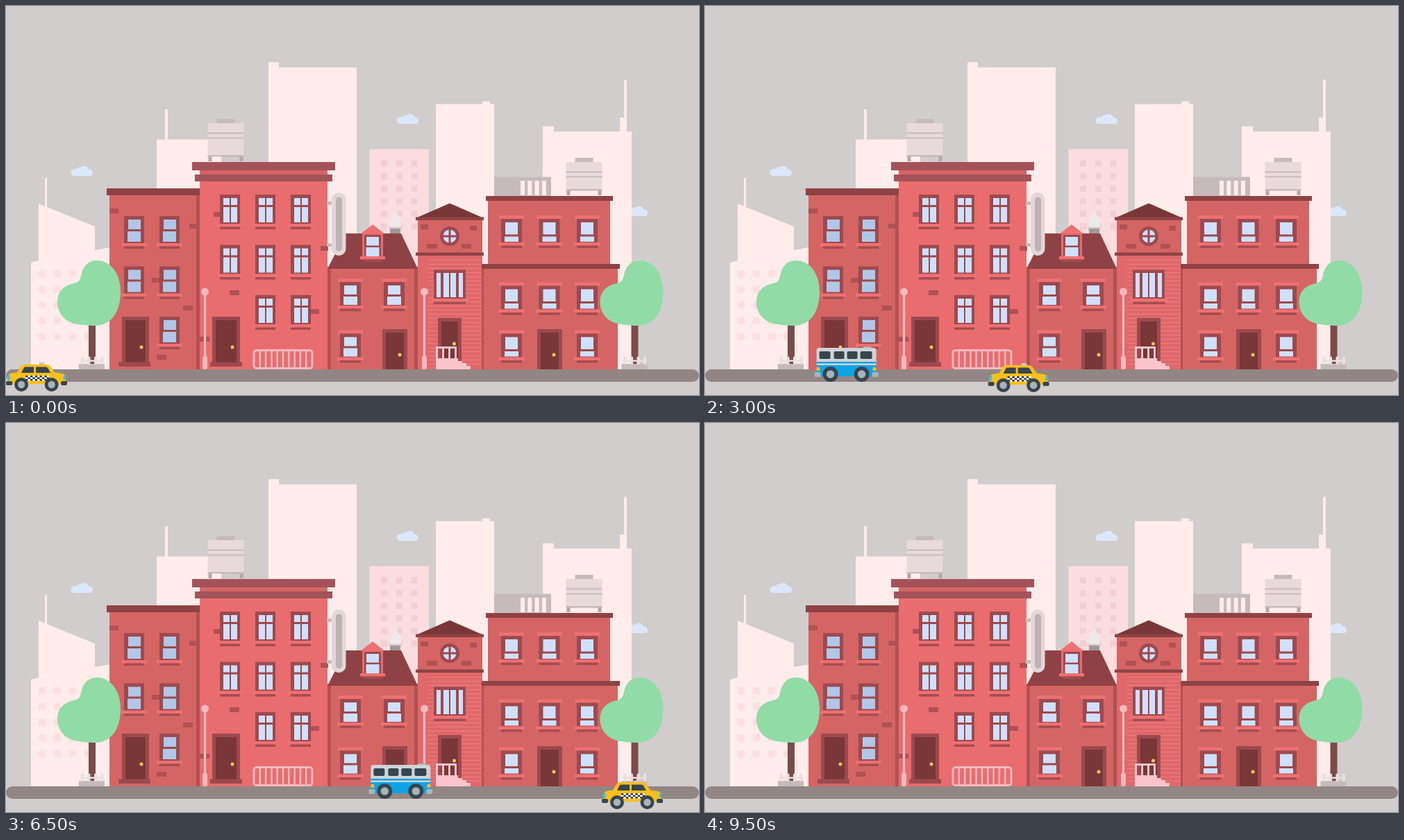
An HTML page that plays this animation: 998x561 px, repeating every 10000 ms.

```html
<!DOCTYPE html>
<html lang="en">
<head>
<meta charset="utf-8">
<title>City street</title>
<style>
html, body { margin: 0; width: 100%; height: 100%; overflow: hidden; background: #d1cdcc; }
svg { display: block; width: 100%; height: 100%; }
</style>
</head>
<body>
<svg id="stage" viewBox="0 0 998 561" preserveAspectRatio="none"></svg>
<script>
const LOOP = 10000;
const C = {
  pale: '#ffeceb', brick: '#d46564', coral: '#e96c6e', sill: '#ee7072', frame: '#9c4a4f',
  roof: '#8f4245', shade: '#b05154', door: '#7a3737', knob: '#f5c26b', glass: '#cfe0fd',
  dimGlass: '#b1c7e8', pink: '#f6b9bf', stone: '#c7babb', ink: '#37454f'
};

// Shape helpers; rectangles are given by their edges.
const box = (x1, y1, x2, y2, fill, r = 0) =>
  `<rect x="${x1}" y="${y1}" width="${x2 - x1}" height="${y2 - y1}" rx="${r}" fill="${fill}"/>`;
const poly = (points, fill) => `<polygon points="${points}" fill="${fill}"/>`;
const dot = (x, y, r, fill) => `<circle cx="${x}" cy="${y}" r="${r}" fill="${fill}"/>`;
const path = (d, fill) => `<path d="${d}" fill="${fill}"/>`;
const each = (list, draw) => list.map(draw).join('');
const grid = (xs, ys, draw) => each(ys, y => each(xs, x => draw(x, y)));
const steps = (from, gap, count) => Array.from({ length: count }, (_, i) => from + i * gap);
const bricks = list => each(list, ([x, y, w]) => box(x, y, x + w, y + 7, C.shade));

function sill(x1, x2, y) {
  return box(x1 - 4, y, x2 + 4, y + 4.5, C.sill) + box(x1, y + 4.5, x2, y + 8, '#a44c50');
}

function sashWindow(x, y) {
  return box(x, y, x + 29, y + 40, C.frame) +
    box(x + 6, y + 5, x + 24, y + 19, C.dimGlass) +
    box(x + 5, y + 22, x + 24, y + 37, C.dimGlass) + sill(x, x + 29, y + 39);
}

function crossWindow(x, y) {
  return box(x, y, x + 29, y + 42, C.frame) +
    grid([x + 5, x + 16], [y + 5], (a, b) =>
      box(a, b, a + 9, b + 10, C.glass) + box(a, b + 13, a + 9, b + 35, C.glass)) +
    sill(x, x + 29, y + 42);
}

// split: height of the lower edge of the upper pane
function hoodWindow(x, y, split) {
  return box(x - 3, y - 5, x + 33, y, C.sill) + box(x, y, x + 30, y + 34, C.frame) +
    box(x + 6, y + 5, x + 24, y + split, C.glass) +
    box(x + 5, y + split + 3, x + 25, y + 33, C.glass) + sill(x, x + 30, y + 34);
}

function door(x1, y1, x2, y2, knobX, knobY) {
  return box(x1, y1, x2, y2, C.frame) + box(x1 + 5, y1 + 5, x2 - 5, y2, C.door) +
    dot(knobX, knobY, 2.5, C.knob);
}

function cloud(x, y) {
  return path(`M${x + 5},${y} a5,5 0 0 1 0,-9.5 q2,-1.5 5,0 a5.5,5.5 0 0 1 6,-3
    a6.5,6.5 0 0 1 11,3 q6,0 6,5.5 q0,4 -4,4z`, '#dce8fa');
}

function tank(x, top, bottom, foot) {
  const w = 52;
  return box(x + 13, top, x + 39, top + 7, C.stone) +
    box(x + 1, bottom, x + 6, foot, '#b5a7a8') + box(x + 46, bottom, x + 51, foot, '#b5a7a8') +
    box(x, top + 6, x + w, bottom, '#e8d9db') +
    grid([x], [top + 19.5, top + 26.5], (a, b) => box(a, b, a + w, b + 1.8, C.stone)) +
    box(x, bottom - 1, x + w, bottom + 1.5, C.stone);
}

function skyline() {
  return cloud(92, 245) + cloud(561, 170) + cloud(891, 303) +
    box(56, 248, 59, 292, C.pale) +
    poly('47,285 128,318 128,352 150,348 150,524 36,524 36,370 47,367', C.pale) +
    grid(steps(47, 22, 4), steps(381, 22.7, 5), (x, y) => box(x, y, x + 10, y + 10, '#ffdedf')) +
    box(229, 149, 233, 194, C.pale) + box(217, 192.5, 310, 264, C.pale) +
    box(378, 81, 393, 90, C.pale) + box(378, 88.5, 505, 380, C.pale) +
    box(523.5, 206.5, 609, 380, '#fbdddf') +
    grid([540, 562, 583.5], steps(222.5, 18.2, 6), (x, y) => box(x, y, x + 9, y + 9, '#f3cfd1')) +
    box(686, 137.5, 697, 143, C.pale) + box(619, 141.5, 703, 375, C.pale) +
    box(773, 173.5, 789, 183, C.pale) + box(773, 181, 901, 524, C.pale) +
    box(890, 106.5, 894, 183, C.pale) + box(884, 161, 894, 183, C.pale);
}

function rowhouse() {
  return box(149, 270, 279, 524, C.brick) + box(274, 273, 279, 524, C.shade) +
    box(145, 263, 279, 273, C.roof) +
    bricks([[149, 292, 13], [264, 314, 10], [210, 392, 11], [255, 432, 14], [217, 503, 14]]) +
    grid([170, 221], [303, 375.5], sashWindow) + sashWindow(221, 448) +
    door(167, 448, 206, 514, 195, 492) + box(162, 513.5, 208, 520, C.frame);
}

function tallHouse() {
  const cornice = '#a4525a';
  return box(279, 250, 463, 524, C.coral) + box(279, 236, 463, 244, C.brick) +
    box(268, 225, 474, 237, cornice) + box(272, 243, 470, 253, cornice) +
    bricks([[299, 297, 10], [322, 410, 14], [439, 437, 12], [453, 346, 11], [279, 477, 14]]) +
    grid([308, 359, 410], [272, 344.5], crossWindow) + grid([359, 410], [417], crossWindow) +
    door(297, 448, 337, 514, 326, 492) + box(294, 513.5, 340, 520, C.frame) +
    `<rect x="357" y="496.5" width="84" height="26" rx="4" fill="none" stroke="${C.pink}" stroke-width="3"/>` +
    each(steps(364.5, 8.3, 9), x => box(x, 497, x + 2.6, 522, C.pink));
}

function sign() {
  return box(462, 282, 472, 287, C.stone) + box(462, 342, 472, 347, C.stone) +
    box(469, 269, 489.5, 360, '#e2d8d8', 10) + box(475, 275.5, 484, 354, '#bfb2b2', 4.5);
}

function cottage() {
  return path('M554,320 q-5,-5 0,-9 q-2,-5 4,-7 q-1,-5 5,-9 q-1,6 2,8 q5,3 3,8 q3,5 -1,9z', '#eeeae9') +
    box(551, 318.5, 569, 322, '#d7cdcd') + box(553, 321, 568, 330, '#a39797') +
    box(463, 376, 593, 524, C.brick) + box(463, 378, 468, 524, C.shade) +
    box(588, 378, 593, 524, C.shade) + poly('489,328 569,328 593,379 463,379', C.roof) +
    box(513, 327, 543, 362, C.coral) + box(516, 330, 540, 362, C.frame) +
    poly('511,328.5 528,315 545,328.5', C.sill) +
    box(519, 333, 537, 345.5, C.glass) + box(518.5, 348, 537.5, 361, C.glass) + sill(514, 542, 361) +
    grid([481, 544], [398], (x, y) => hoodWindow(x, y, 18)) + hoodWindow(481, 472.5, 18) +
    door(542, 466, 578, 524, 567, 503);
}

function townHall() {
  return box(593, 308, 686, 524, C.brick) + box(593, 360, 686, 524, '#e0686a') +
    each(steps(366, 6, 26), y => box(607, y, 686, y + 1, '#ec7f80')) +
    poly('639,284.5 590,306 688,306', C.door) + box(590, 304.5, 688, 309, C.roof) +
    box(590, 355.5, 688, 360, C.roof) +
    bricks([[597, 315, 11], [606, 343, 15], [656, 343, 14], [668, 317, 10]]) +
    dot(639, 332, 14, C.frame) + dot(639, 332, 9.5, C.glass) +
    box(637.5, 321, 640.5, 343, C.frame) + box(628, 330.5, 650, 333.5, C.frame) +
    box(616, 380.5, 662, 422, C.frame) +
    each([[620, 6], [630, 8], [640, 8], [652, 6]], ([x, w]) => box(x, 385, x + w, 420, C.glass)) +
    sill(616, 662, 422) +
    door(622, 450, 656, 524, 645.5, 487) +
    poly('619,508 651,508 651,512 657,512 657,515 663,515 663,519 669,519 669,524 619,524', '#fac4ca') +
    box(619, 491, 649, 494, '#fac4ca') +
    each(steps(619, 9, 4), x => box(x, 491, x + 3, 510, '#fac4ca'));
}

function wideHouse() {
  const tallPane = (x, y) => hoodWindow(x, y, 22.5);
  return box(703, 246.5, 785, 275, C.stone) +
    each(steps(741, 10.3, 4), x => box(x, 252, x + 6, 273, C.pale)) +
    box(694, 279, 870, 375, C.brick) + box(691, 274, 874, 281, C.roof) +
    box(685, 377, 881, 524, C.brick) + box(685, 379, 688, 524, C.shade) +
    box(685, 372, 884, 379, C.roof) +
    grid([713, 767.5, 822], [307, 403.5], tallPane) + grid([713, 822], [472.5], tallPane) +
    door(765, 466, 801, 524, 789, 503);
}

function lamp(x) {
  return box(x - 1.7, 412, x + 1.7, 524, C.pink) + box(x - 3.5, 505, x + 3.5, 524, C.pink, 2) +
    dot(x, 412, 5.5, C.pink);
}

function tree(dx) {
  return `<g transform="translate(${dx} 0)">` + box(119, 455, 129, 517, '#7c4a4c') +
    path(`M131,367 C151,367 165,386 165,412 C165,442 151,461 128,461 C117,461 112,460 104,459
      C87,457 74,445 74,427 C74,409 87,402 98,400 C109,398 107,390 110,382 C114,372 121,367 131,367z`, '#91dba7') +
    box(105, 516, 142, 524, C.stone) + box(107, 510.5, 141, 513, '#eadfdf') +
    each(steps(108, 9.5, 4), x => box(x, 505.5, x + 4, 517, '#eadfdf', 1.5)) + '</g>';
}

// Vehicles: the origin lies midway between the wheel hubs.
const wheel = (x, r) => dot(x, 0, r, C.ink) + dot(x, 0, r * 0.52, '#a9b4b8');

function taxi() {
  const checks = grid(steps(-16, 3.4, 10), [0, 1, 2], (x, row) =>
    (Math.round((x + 16) / 3.4) + row) % 2 ? '' : box(x, -13 + row * 2.5, x + 3.4, -10.5 + row * 2.5, '#30363a'));
  return box(3.5, -32, 12, -26, '#d3c8c6', 2) +
    path('M-42,-4 V-11 Q-41,-16 -35,-16.5 L-28,-17.5 L-23,-26 Q-21.5,-29 -18,-29 H14 Q18,-29 20,-26 L26,-17.5 L36,-16 Q42,-15 42,-9 V-4 Q42,-1 38,-1 H-38 Q-42,-1 -42,-4z', '#fdbf1b') +
    path('M-17,-25.5 H-4 V-17 H-22 L-18.5,-24z', C.ink) +
    path('M-1,-25.5 H13 Q15,-25.5 16,-24 L20,-17 H-1z', C.ink) +
    box(-16, -13, 18, -5.5, '#fff') + checks +
    box(-42, -14, -38.5, -6, '#2fc4e8', 1.5) + box(38.5, -13, 42, -7, '#2fc4e8', 1.5) +
    box(-44, -5, -35, 1, C.ink, 2) + box(35, -5, 44, 1, C.ink, 2) +
    wheel(-22, 10) + wheel(21.5, 10);
}

function bus() {
  return box(24, -40, 36, -34, '#b3b1b5', 1.5) +
    box(-43, -38, 43, -14, '#ced4d6', 4) +
    box(-43, -18, 43, 3, '#0ea4e4', 2) + box(-43, -15.5, 43, -13, '#ced4d6') +
    each([[-39, 16], [-18, 15], [1, 15], [20, 17]], ([x, w]) => box(x, -33, x + w, -22, C.ink, 2)) +
    box(-43, -10, -38, -5, '#fbb829', 1) + box(38, -10, 43, -5, '#fbb829', 1) +
    box(-46, -3, -37, 4, '#a9b4b8', 2) + box(37, -3, 46, 4, '#a9b4b8', 2) +
    wheel(-23, 11) + wheel(22, 11);
}

const stage = document.getElementById('stage');
stage.innerHTML = box(0, 0, 998, 561, '#d1cdcc') + skyline() +
  tank(290.5, 163, 216, 224) + box(297, 217, 308, 225, C.pale) + tank(806.5, 219, 265, 273) +
  rowhouse() + tallHouse() + cottage() + sign() + townHall() + wideHouse() +
  lamp(286.5) + lamp(602.5) + tree(0) + tree(781.5) +
  box(0, 524, 998, 542, '#928685', 9) +
  `<g id="bus">${bus()}</g><g id="taxi">${taxi()}</g>`;

// Each stop: time, x, y.
const taxiRoute = [[0, 44, 546], [2000, 309, 547.5], [3000, 451.5, 547], [4500, 632, 549.5],
  [5500, 765.5, 547], [7000, 970, 547], [7500, 1046, 547], [LOOP, 1120, 547]];
const busRoute = [[0, -82, 531], [2000, 110.5, 531], [3000, 203.5, 531], [4500, 361, 531],
  [5500, 462, 531], [7500, 674.5, 531], [8000, 740, 531], [8500, 833, 531],
  [9000, 942, 531], [9500, 1050, 531], [LOOP, 1120, 531]];

function along(route, t) {
  const i = route.findIndex(stop => stop[0] > t);
  const a = route[i - 1], b = route[i];
  const k = (t - a[0]) / (b[0] - a[0]);
  return [1, 2].map(n => a[n] + (b[n] - a[n]) * k);
}

function place(id, route, t) {
  const [x, y] = along(route, t);
  document.getElementById(id).setAttribute('transform', `translate(${x.toFixed(2)} ${y.toFixed(2)})`);
}

function render(t) {
  place('taxi', taxiRoute, t);
  place('bus', busRoute, t);
}

const start = performance.now();
function tick() {
  render((performance.now() - start) % LOOP);
  requestAnimationFrame(tick);
}
render(0);
requestAnimationFrame(tick);
</script>
</body>
</html>
```
